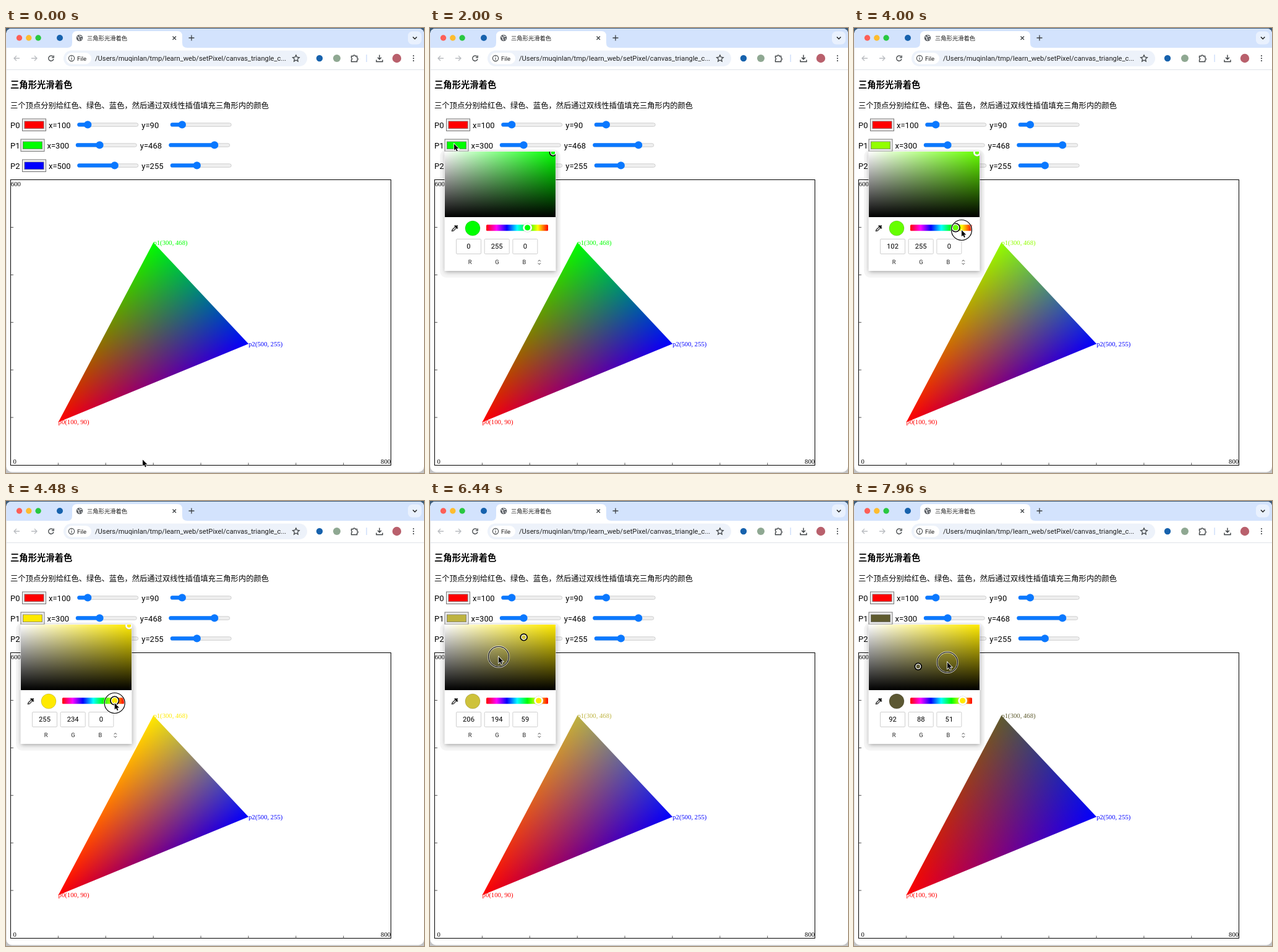
Recreate the animation shown at these times as an HTML page with a canvas. Size 676 px wide and 720 px high, loop 8000 ms.

```html
<!DOCTYPE html>
<html lang="zh-CN">
<head>
<meta charset="utf-8">
<title>三角形光滑着色</title>
<style>
html, body { margin: 0; width: 100%; height: 100%; overflow: hidden; background: #fff; }
canvas { display: block; }
</style>
</head>
<body>
<canvas id="stage" width="676" height="720"></canvas>
<script>
const c = document.getElementById('stage').getContext('2d');
const LOOP = 8000, STEP = 40, PICKER_LAG = 280, PAGE_LAG = 220;
const UI = 'Roboto, "Noto Sans CJK SC", "Noto Sans CJK", sans-serif';
const CJK = '"Noto Sans CJK SC", "Noto Sans CJK", sans-serif';
const SERIF = '"Liberation Serif", serif';
const SCALE = 0.769, ORIGIN = { x: 7.7, y: 707 };
const FIELD = { x: 24, y: 200, w: 179, h: 106 };
const HUE = { x: 91, w: 100, y: 323 };
const clamp = (v, lo, hi) => Math.min(hi, Math.max(lo, v));

// Pointer path: time, x, y, eased
const PATH = [
  [560, 221, 698.5], [1480, 39, 187.5, 1], [2200, 39, 187.5], [3000, 157.67, 327, 1],
  [3500, 157.67, 327], [3720, 164.33, 327], [3780, 167.2, 327], [4000, 174, 327],
  [4200, 175.72, 327], [4800, 175.72, 327], [5400, 183, 236], [5700, 201, 202],
  [5880, 201, 202], [6160, 151.7, 220.4], [6440, 111, 252], [6900, 70, 268],
  [7350, 64, 271], [7680, 103.8, 267.8], [7960, 151, 261]
];
const PRESSES = [[1560, 1720], [3080, 4720], [5800, 8000]];
const POPUP_AT = 1640, HUE_DRAG = [3080, 4720], FIELD_DRAG = 5800;

function pointer(t) {
  const i = PATH.findIndex(k => k[0] > t);
  if (i < 0) { const k = PATH[PATH.length - 1]; return { x: k[1], y: k[2] }; }
  if (i === 0) return { x: PATH[0][1], y: PATH[0][2] };
  const a = PATH[i - 1], b = PATH[i];
  let u = (t - a[0]) / (b[0] - a[0]);
  if (b[3]) u = u * u * (3 - 2 * u);
  return { x: a[1] + (b[1] - a[1]) * u, y: a[2] + (b[2] - a[2]) * u };
}

function hsv(h, s, v) {
  const f = n => {
    const k = (n + h / 60) % 6;
    return Math.round(255 * v * (1 - s * clamp(Math.min(k, 4 - k), 0, 1)));
  };
  return [f(5), f(3), f(1)];
}
const css = rgb => `rgb(${rgb})`;

function colorState(t) {
  const hueX = pointer(clamp(t, ...HUE_DRAG)).x;
  const h = 360 * (1 - (hueX - HUE.x) / HUE.w);
  let s = 1, v = 1;
  if (t >= FIELD_DRAG) {
    const p = pointer(t);
    s = clamp((p.x - FIELD.x) / FIELD.w, 0, 1);
    v = clamp(1 - (p.y - FIELD.y) / FIELD.h, 0, 1);
  }
  return { h, s, v, hueX, rgb: hsv(h, s, v) };
}

function paint(fill, stroke, width = 1) {
  if (fill) { c.fillStyle = fill; c.fill(); }
  if (stroke) { c.strokeStyle = stroke; c.lineWidth = width; c.stroke(); }
}
function rect(x, y, w, h, fill) { c.fillStyle = fill; c.fillRect(x, y, w, h); }
function round(x, y, w, h, r, fill, stroke, width) {
  c.beginPath(); c.roundRect(x, y, w, h, r); paint(fill, stroke, width);
}
function circle(x, y, r, fill, stroke, width) {
  c.beginPath(); c.arc(x, y, r, 0, Math.PI * 2); paint(fill, stroke, width);
}
function path(d, stroke, width = 1.4, fill) {
  const p = new Path2D(d);
  if (fill) { c.fillStyle = fill; c.fill(p); }
  if (stroke) { c.strokeStyle = stroke; c.lineWidth = width; c.stroke(p); }
}
function text(s, x, y, size, { font = UI, color = '#000', align = 'left', weight = 400 } = {}) {
  c.font = `${weight} ${size}px ${font}`;
  c.fillStyle = color;
  c.textAlign = align;
  c.fillText(s, x, y);
}
function gradient(x0, y0, x1, y1, colors) {
  const g = c.createLinearGradient(x0, y0, x1, y1);
  colors.forEach((col, i) => g.addColorStop(i / (colors.length - 1), col));
  return g;
}

function drawBrowser() {
  const ink = '#3c4043';
  rect(0, 0, 676, 720, '#c2c3c5');
  rect(0, 0, 676, 8, '#3b5a78');
  round(0.5, 1, 675.5, 717.5, [8, 8, 9, 9], '#fff');
  round(0.5, 1, 675.5, 31, [8, 8, 0, 0], '#d3e3fd');
  ['#fe5f57', '#febc2e', '#28c840'].forEach((col, i) => circle(21.5 + i * 15.3, 16, 4.7, col));
  circle(87, 16, 5, '#1762ad');

  path('M99 32Q107 32 107 24V13Q107 5 115 5H277Q285 5 285 13V24Q285 32 293 32Z', null, 0, '#fff');
  circle(119, 16, 5.3, '#5f6368');
  path('M115 14l3 1.5l-.5 2l1.5 2.5M119 11.5l1 2.5l3-.5M121 17.5l2 .5', '#fff', 1.2);
  text('三角形光滑着色', 131, 19.6, 9.3, { font: CJK, color: '#1f1f1f' });
  path('M269.5 13.5l5.5 5.5M275 13.5l-5.5 5.5', ink, 1.3);
  path('M295.5 16h9M300 11.5v9', ink, 1.3);
  round(650, 5.5, 22, 21, 7, '#e9f1fe');
  path('M658 14.5l3.2 3.2l3.2-3.2', '#1f1f1f', 1.5);

  path('M22 49H13M17 45l-4 4l4 4M41 49h9M46 45l4 4l-4 4', '#b9bcc0', 1.3);
  path('M76 46.2A4.2 4.2 0 1 0 77 50.3M77.2 44.5v3.3h-3.3', ink, 1.3);
  round(93, 36.5, 394, 25.5, 12.8, '#edf2fa');
  round(97, 40, 41, 18.5, 9.2, '#fff');
  circle(106, 49, 4.6, null, ink, 1.1);
  path('M106 48.3v3.2M106 46v1.1', ink, 1.1);
  text('File', 115, 52.6, 9.6, { color: '#1f1f1f' });
  text('/Users/muqinlan/tmp/learn_web/setPixel/canvas_triangle_c...', 144, 53, 11.2, { color: '#1f1f1f' });
  path('M469 43.7l1.6 3.5l3.8.4l-2.9 2.6l.8 3.8l-3.3-2l-3.3 2l.8-3.8l-2.9-2.6l3.8-.4Z', ink, 1.2);

  circle(507, 49, 5.2, '#1762ad');
  circle(535, 49, 6, '#8fa892');
  path('M558.5 45.5h3a1.6 1.6 0 0 1 3.2 0h3v3.2a1.6 1.6 0 0 1 0 3.2v2.6h-9.2v-3a1.7 1.7 0 0 0 0-3.2Z', ink, 1.3);
  rect(582.5, 43, 1.2, 12, '#c3d7fa');
  path('M604 43.5v7M601 47.8l3 3l3-3M599 51.5v3h10v-3', ink, 1.4);
  circle(632, 49, 7.2, '#b9606c');
  [45, 49, 53].forEach(y => circle(659, y, 1.1, ink));
  rect(1, 67, 675, 1, '#dfe3e8');
}

function slider(x, y, part) {
  const thumb = x + 6 + 87 * part;
  round(x + 0.5, y - 2.5, 98, 5.5, 2.8, '#efefef', '#c6c6c6', 0.8);
  round(x, y - 3, thumb - x, 6.3, 3.1, '#0a78ff');
  circle(thumb, y + 0.1, 6.2, '#0a78ff');
}

function drawControls(points) {
  text('三角形光滑着色', 7, 97.3, 14.35, { font: CJK, weight: 700 });
  text('三个顶点分别给红色、绿色、蓝色，然后通过双线性插值填充三角形内的颜色', 7, 130.3, 12.3, { font: CJK });
  points.forEach((p, i) => {
    const dx = i === 1 ? -2.5 : 0, dy = i * 33;
    text('P' + i, 7, 162.4 + dy, 13);
    rect(26 + dx, 146.5 + dy, 39, 20.5, '#767676');
    rect(27 + dx, 147.5 + dy, 37, 18.5, '#efefef');
    rect(29.5 + dx, 150.5 + dy, 32, 12.5, '#777');
    rect(30.3 + dx, 151.2 + dy, 30.4, 11.1, css(p.rgb));
    text('x=' + p.x, 69 + dx, 162.4 + dy, 13);
    slider(115.3 + dx, 156.3 + dy, p.x / 800);
    text('y=' + p.y, 219.3 + dx, 162.4 + dy, 13);
    slider(265.8 + dx, 156.3 + dy, p.y / 600);
  });
}

function drawPlot(points) {
  c.strokeStyle = '#000';
  c.lineWidth = 1;
  c.strokeRect(7.5, 245.5, 615, 462);
  for (let v = 100; v < 800; v += 100) {
    const d = v * SCALE;
    rect(ORIGIN.x + d - 0.7, 703.5, 1, 4, '#555');
    if (v < 600) rect(8, ORIGIN.y - d - 0.5, 4, 1, '#555');
  }
  text('600', 8, 256, 10.6, { font: SERIF });
  text('0', 11.5, 705, 10.6, { font: SERIF });
  text('800', 622, 705, 10.6, { font: SERIF, align: 'right' });

  const v = points.map(p => ({ x: ORIGIN.x + p.x * SCALE, y: ORIGIN.y - p.y * SCALE }));
  const triangle = new Path2D();
  v.forEach(q => triangle.lineTo(q.x, q.y));
  triangle.closePath();
  c.fillStyle = '#000';
  c.fill(triangle);
  // Each vertex colour fades to black at its opposite edge; the sum is the barycentric blend.
  c.globalCompositeOperation = 'lighter';
  v.forEach((q, i) => {
    const a = v[(i + 1) % 3], b = v[(i + 2) % 3];
    const ex = b.x - a.x, ey = b.y - a.y;
    const k = ((q.x - a.x) * ex + (q.y - a.y) * ey) / (ex * ex + ey * ey);
    c.fillStyle = gradient(q.x, q.y, a.x + ex * k, a.y + ey * k, [css(points[i].rgb), '#000']);
    c.fill(triangle);
  });
  c.globalCompositeOperation = 'source-over';
  points.forEach((p, i) =>
    text(`p${i}(${p.x}, ${p.y})`, v[i].x, v[i].y + 3.7, 10.7, { font: SERIF, color: css(p.rgb) }));
}

function knob(x, y, r, color, focused) {
  circle(x, y, r, focused ? '#000' : '#bbb');
  circle(x, y, r - (focused ? 1.7 : 0.4), '#fff');
  circle(x, y, r - 3, color);
}

function drawPicker(state, hueFocused) {
  const { h, s, v, hueX, rgb } = state;
  round(16, 197, 195, 207, 11, 'rgba(0,0,0,.035)');
  c.save();
  c.shadowColor = 'rgba(0,0,0,.35)';
  c.shadowBlur = 7;
  c.shadowOffsetY = 2;
  rect(23.5, 199.5, 180, 193.5, '#fff');
  c.restore();

  const pure = css(hsv(h, 1, 1)), f = FIELD;
  c.save();
  c.beginPath();
  c.rect(f.x, f.y, f.w, f.h);
  c.clip();
  rect(f.x, f.y, f.w, f.h, gradient(f.x, 0, f.x + f.w, 0, ['#fff', pure]));
  rect(f.x, f.y, f.w, f.h, gradient(0, f.y, 0, f.y + f.h, ['rgba(0,0,0,0)', '#000']));
  knob(Math.min(f.x + s * f.w, 199), Math.max(f.y + (1 - v) * f.h, 201.5), 6.2, css(rgb), !hueFocused);
  c.restore();

  path('M35.5 328.5l.6-2.2l5-5l1.8 1.8l-5 5Z', '#222', 1.3);
  path('M40 319.5l4.7 4.7M42.3 321.8l2.2-2.2', '#111', 2.3);
  circle(69, 324, 12, css(rgb), 'rgba(0,0,0,.2)', 0.8);
  round(HUE.x, 318.3, HUE.w, 10, 1.5,
    gradient(HUE.x, 0, HUE.x + HUE.w, 0, ['#f00', '#f0f', '#00f', '#0ff', '#0f0', '#ff0', '#f00']));
  knob(hueX, HUE.y, 7.6, pure, hueFocused);

  rgb.forEach((n, i) => {
    const x = 42.5 + i * 45.7;
    round(x, 341.5, 40, 24, 1.5, '#fff', '#cfcfcf');
    text(n, x + 20, 357.4, 11.2, { align: 'center' });
    text('RGB'[i], 64.5 + i * 44, 382, 9.3, { align: 'center', color: '#222' });
  });
  path('M174.7 377.6l2.1-2.1l2.1 2.1M174.7 380.4l2.1 2.1l2.1-2.1', '#333', 1);
}

function drawPointer(t) {
  const { x, y } = pointer(t);
  if (PRESSES.some(([from, to]) => t >= from && t < to)) {
    circle(x, y, 16.5, null, 'rgba(255,255,255,.75)', 2.8);
    circle(x, y, 16.5, null, '#000', 1.2);
  }
  c.save();
  c.translate(x, y);
  path('M0 0V10.3L2.4 8.2L4.1 12L5.8 11.3L4.1 7.6H7.4Z', '#fff', 1.6, '#000');
  path('M0 0V10.3L2.4 8.2L4.1 12L5.8 11.3L4.1 7.6H7.4Z', null, 0, '#000');
  c.restore();
}

function render(t) {
  const points = [
    { x: 100, y: 90, rgb: [255, 0, 0] },
    { x: 300, y: 468, rgb: colorState(t - PAGE_LAG).rgb },
    { x: 500, y: 255, rgb: [0, 0, 255] }
  ];
  drawBrowser();
  drawControls(points);
  drawPlot(points);
  if (t >= POPUP_AT) {
    const late = t - PICKER_LAG;
    drawPicker(colorState(late), late >= HUE_DRAG[0] && late < FIELD_DRAG);
  }
  drawPointer(t);
}

const start = performance.now();
function frame() {
  const t = (performance.now() - start) % LOOP;
  render(Math.floor(t / STEP) * STEP);
  requestAnimationFrame(frame);
}
frame();
</script>
</body>
</html>
```
